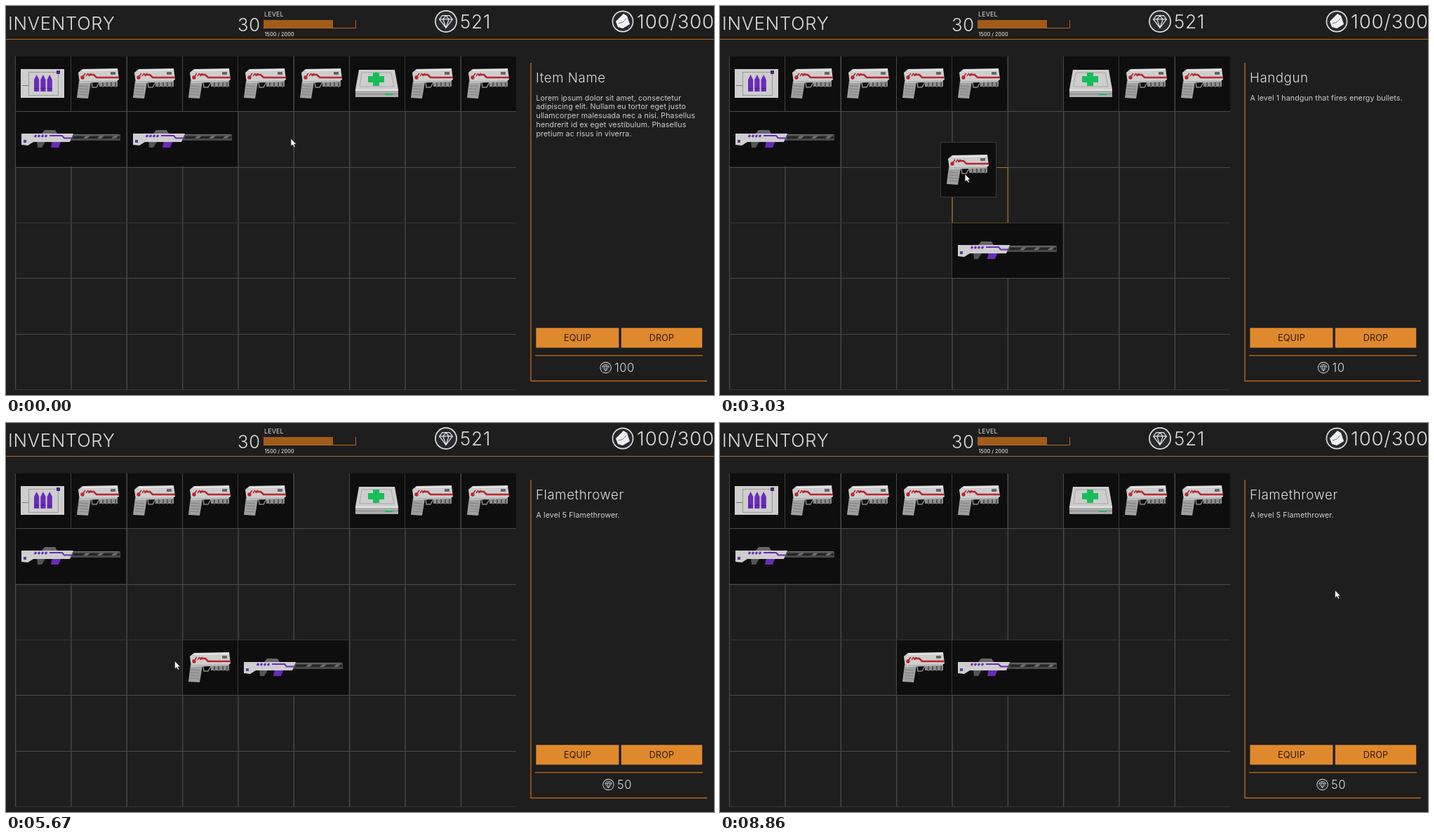
An HTML page with a canvas that plays this animation: 1009x555 px, repeating every 9.59 s.

```html
<!DOCTYPE html>
<html lang="en">
<head>
<meta charset="utf-8">
<title>Inventory</title>
<style>
  html, body { margin: 0; width: 100%; height: 100%; overflow: hidden; background: #1e1e1e; }
  canvas { display: block; }
</style>
</head>
<body>
<canvas id="stage" width="1009" height="555"></canvas>
<script>
const ctx = document.getElementById('stage').getContext('2d');
const LOOP = 9590;
const GRID = { x: 12.9, y: 71.4, pitch: 79.35, cols: 9, rows: 6 };
const ORANGE = '#b8661c', AMBER = '#e0892c', PALE = '#dcdcdc';
const PURPLE = '#6a2bb8', RED = '#b8262c', GREEN = '#18bd58', METAL = '#cecece';

const colX = c => GRID.x + c * GRID.pitch;
const rowY = r => Math.floor(GRID.y + r * GRID.pitch);

function rect(x, y, w, h, fill) {
  ctx.fillStyle = fill;
  ctx.fillRect(x, y, w, h);
}

function trace(points) {
  ctx.beginPath();
  for (let i = 0; i < points.length; i += 2) ctx.lineTo(points[i], points[i + 1]);
}

function poly(points, fill) {
  trace(points);
  ctx.fillStyle = fill;
  ctx.fill();
}

function line(points, color, width = 1) {
  trace(points);
  ctx.strokeStyle = color;
  ctx.lineWidth = width;
  ctx.stroke();
}

function disc(x, y, r, fill) {
  ctx.beginPath();
  ctx.arc(x, y, r, 0, 7);
  ctx.fillStyle = fill;
  ctx.fill();
}

function repeat(count, x, step, draw) {
  for (let i = 0; i < count; i++) draw(x + i * step);
}

function at(x, y, draw, scale = 1) {
  ctx.save();
  ctx.translate(x, y);
  ctx.scale(scale, scale);
  draw();
  ctx.restore();
}

// Large sizes get extra tracking to undo the tighter display cut.
function setFont(size, weight) {
  ctx.font = `${weight} ${size}px Inter, "Open Sans", sans-serif`;
  ctx.letterSpacing = `${size * (size > 14 ? 0.03 : 0.01)}px`;
}

function text(str, x, y, size, { color = PALE, weight = 300, align = 'left' } = {}) {
  setFont(size, weight);
  ctx.textAlign = align;
  ctx.fillStyle = color;
  ctx.fillText(str, x, y);
}

// Item art, relative to the corner of its cell.
const art = {
  ammo() {
    rect(8, 19, 62, 41, METAL);
    ctx.strokeStyle = '#999';
    ctx.lineWidth = 1;
    ctx.strokeRect(19.5, 23.5, 42, 33);
    rect(10, 42, 9, 1, '#777');
    rect(59, 21, 5, 5, '#46247c');
    repeat(3, 27, 9.3, x => {
      poly([x, 51, x, 34, x + 3.6, 27, x + 7.2, 34, x + 7.2, 51], PURPLE);
      rect(x, 46, 7.2, 1, '#43207a');
    });
  },
  handgun() {
    poly([12, 36, 29, 37, 25, 61, 9, 60], '#a0a0a0');
    repeat(4, 43, 4, y => line([12, y, 25, y + 1], '#808080'));
    line([30, 38, 31, 45, 37, 45, 41, 38], '#888', 1.5);
    rect(41, 35, 26, 9, '#8d8d8d');
    repeat(4, 45, 6, x => rect(x, 38, 2, 7, '#555'));
    poly([11, 24, 17, 19, 67, 18, 69, 34, 64, 37, 13, 39], METAL);
    line([17, 21, 67, 20], '#e8e8e8', 2);
    line([13, 37, 64, 36], '#a2a2a2');
    line([25, 27, 33, 27, 37, 31, 69, 31], RED, 2.6);
    repeat(3, 18, 4, x => line([x, 29, x + 3, 25], RED, 1.6));
    disc(17, 31, 2.7, RED);
    rect(57, 23, 7, 4, '#666');
  },
  medkit() {
    poly([14, 20, 65, 20, 70, 48, 9, 48], METAL);
    rect(9, 48, 61, 11, '#acacac');
    rect(9, 48, 61, 2, '#e4e4e4');
    line([18, 24, 60, 24, 64, 44, 15, 44, 18, 24], '#a6a6a6');
    rect(9, 54, 61, 1, '#858585');
    rect(27, 29, 23, 9, GREEN);
    rect(34, 24, 9, 19, GREEN);
    rect(51, 54, 11, 2, GREEN);
  },
  rifle() {
    poly([31, 42, 44, 42, 38, 52, 32, 52], '#555');
    poly([53, 42, 66, 42, 62, 52, 51, 52], PURPLE);
    poly([38, 32, 42, 27, 57, 27, 60, 32], '#666');
    rect(78, 33, 72, 9, '#484848');
    rect(78, 33, 70, 1, '#777');
    rect(83, 36, 66, 3, '#242424');
    repeat(3, 97, 20, x => poly([x, 39, x + 4, 35, x + 10, 35, x + 6, 39], '#6c6c6c'));
    poly([9, 32, 83, 32, 78, 44, 26, 44, 18, 49, 9, 48], METAL);
    repeat(4, 28, 5, x => line([x, 37, x + 2, 34], PURPLE, 3));
    line([49, 35, 67, 35, 70, 38.5, 81, 38.5], PURPLE, 2);
    rect(12, 41, 4, 4, '#56409a');
  }
};

const spanOf = item => item.art === 'rifle' ? 2 : 1;

function drawItem(item, x, y) {
  rect(x + 1, y + 1, Math.floor(spanOf(item) * GRID.pitch) - 1, 78, '#0e0e0e');
  at(x, y, art[item.art]);
}

function badge() {
  disc(0, 0, 15.4, '#e2e2e2');
  disc(0, 0, 13.8, '#292a30');
}

function drawGem(x, y, r) {
  at(x, y, () => {
    badge();
    line([0, 9, -9, -3, -5, -8, 5, -8, 9, -3, 0, 9, -4, -3, 0, -8, 4, -3, 0, 9], '#e8e8e8', 1.2);
    line([-9, -3, 9, -3], '#e8e8e8', 1.2);
  }, r / 15);
}

function drawHeader() {
  text('INVENTORY', 3, 33.5, 25.6);
  text('30', 330, 36, 25.6);
  text('LEVEL', 368, 14.5, 9, { weight: 400 });
  rect(367, 20, 99, 11, '#a05c1a');
  line([367, 31.5, 498.5, 31.5, 498.5, 20], ORANGE);
  text('1500 / 2000', 368.5, 43, 7.2, { weight: 500 });
  drawGem(627, 22, 15.5);
  text('521', 647, 32, 26.3);
  at(879, 22, () => {
    badge();
    poly([-10, 0, 1, -11, 6, -8, 10, 4, 0, 10, -7, 8], '#f0f0f0');
    line([-6, 3, 0, 1, 5, -4], '#777');
  });
  text('100/300', 899, 32, 27.5);
  rect(0, 47, 1009, 1, ORANGE);
}

const lineV = (c, y0, y1, color) => rect(colX(c), y0, 1.4, y1 - y0, color);
const lineH = (r, x0, x1, color) => rect(x0, rowY(r), x1 - x0, 1, color);

function drawGrid() {
  for (let c = 0; c < GRID.cols; c++) lineV(c, 72, 547, '#484848');
  for (let r = 1; r <= GRID.rows; r++) lineH(r, 13, 727, r % 3 ? '#4a4a4a' : '#363636');
}

const flame = { name: 'Flamethrower', info: ['A level 5 Flamethrower.'], price: '50' };
const panels = [
  { from: 0, name: 'Item Name', price: '100', info: [
    'Lorem ipsum dolor sit amet, consectetur',
    'adipiscing elit. Nullam eu tortor eget justo',
    'ullamcorper malesuada nec a nisi. Phasellus',
    'hendrerit id ex eget vestibulum. Phasellus',
    'pretium ac risus in viverra.'] },
  { from: 900, ...flame },
  { from: 2590, name: 'Handgun', info: ['A level 1 handgun that fires energy bullets.'], price: '10' },
  { from: 4320, ...flame }
];

function drawButton(label, x, w) {
  rect(x, 459.3, w, 28.2, AMBER);
  text(label, x + w / 2, 477.5, 12.7, { color: '#2a1d10', weight: 400, align: 'center' });
}

function drawPanel(t) {
  const panel = panels.findLast(p => t >= p.from);
  line([748, 81, 748, 535, 999, 535], ORANGE, 1.4);
  text(panel.name, 755, 108.5, 18.7);
  panel.info.forEach((row, i) =>
    text(row, 755.5, 134.5 + i * 12.75, 10.65, { color: '#cfcfcf', weight: 400 }));
  drawButton('EQUIP', 755.4, 118);
  drawButton('DROP', 876.8, 115.4);
  rect(754, 498, 239, 1.3, ORANGE);
  setFont(16.7, 300);
  const left = 871.5 - (21 + ctx.measureText(panel.price).width) / 2;
  drawGem(left + 8, 516, 8);
  text(panel.price, left + 20.5, 522, 16.7);
}

// Pointer stops: arrival, departure, x, y. Equal times mean passing through.
const stops = [
  [0, 20, 406, 189],
  [240, 1080, 267, 191],
  [1190, 1190, 301, 239],
  [1650, 2210, 408, 349],
  [2380, 2380, 417, 157],
  [2500, 2720, 440, 118],
  [3180, 3180, 296, 313],
  [3300, 3680, 290, 333],
  [3790, 3790, 266, 290],
  [4150, 4440, 129, 197],
  [4750, 4750, 211, 323],
  [5240, 5650, 243, 343],
  [5880, 6090, 138, 201],
  [6380, 6380, 467, 276],
  [6500, 6500, 620, 299],
  [6890, LOOP, 876.5, 238.5]
];
const path = stops.flatMap(([arrive, leave, x, y]) =>
  arrive === leave ? [[arrive, x, y]] : [[arrive, x, y], [leave, x, y]]);

// Zero at holds and turning points, so the path never overshoots a stop.
function slope(i, axis) {
  const a = path[i - 1], b = path[i], c = path[i + 1];
  if (!a || !c || (b[axis] - a[axis]) * (c[axis] - b[axis]) <= 0) return 0;
  return (c[axis] - a[axis]) / (c[0] - a[0]);
}

function pointer(t) {
  const i = Math.max(0, path.findLastIndex(p => t >= p[0]));
  const a = path[i], b = path[i + 1] || a;
  const span = b[0] - a[0] || 1, u = (t - a[0]) / span;
  return [1, 2].map(k => a[k] + (b[k] - a[k]) * u * u * (3 - 2 * u)
    + slope(i, k) * span * u * (1 - u) ** 2
    + slope(i + 1, k) * span * u * u * (u - 1));
}

// Each drag: start, end, then the cell where the item lands.
const items = [
  { art: 'ammo', cell: [0, 0] },
  ...[1, 2, 3, 4, 7, 8].map(c => ({ art: 'handgun', cell: [c, 0] })),
  { art: 'handgun', cell: [5, 0], drags: [[2720, 3530, 3, 3]] },
  { art: 'medkit', cell: [6, 0] },
  { art: 'rifle', cell: [0, 1], drags: [[4450, 5440, 0, 1], [6110, 7120, 0, 1]] },
  { art: 'rifle', cell: [2, 1], drags: [[1100, 2000, 4, 3]] }
];

function drawHighlight(x, y, span) {
  const c = Math.round((x - GRID.x) / GRID.pitch - 0.01);
  const r = Math.round((y - GRID.y) / GRID.pitch);
  if (c < 0 || r < 0 || c + span > GRID.cols || r >= GRID.rows) return;
  for (const edge of [0, 1]) {
    lineV(c + edge * span, rowY(r), rowY(r + 1), '#8a7020');
    lineH(r + edge, colX(c), colX(c + span), (r + edge) % 3 ? '#94791a' : '#5c4d1c');
  }
}

function drawDragged(item, t) {
  const span = spanOf(item);
  const w = Math.floor(span * GRID.pitch);
  const [cx, cy] = pointer(t - 10);
  const x = Math.round(cx - w / 2 + 0.5), y = Math.round(cy - 39.5);
  drawHighlight(x, y, span);
  drawItem(item, x, y);
  ctx.strokeStyle = '#3a3a3a';
  ctx.lineWidth = 1;
  ctx.strokeRect(x + 0.5, y + 0.5, w, 78);
}

function drawItems(t) {
  let held = null;
  for (const item of items) {
    let cell = item.cell;
    for (const [start, end, c, r] of item.drags || []) {
      if (t >= start && t < end) held = item;
      if (t >= end) cell = [c, r];
    }
    if (held !== item) drawItem(item, Math.round(colX(cell[0])), rowY(cell[1]));
  }
  if (held) drawDragged(held, t);
}

function drawPointer(t) {
  const [x, y] = pointer(t);
  at(x, y, () => {
    const arrow = [0, 0, 0, 11, 2.6, 8.8, 4.4, 12.6, 6.2, 11.9, 4.6, 8.2, 7.8, 8.2, 0, 0];
    poly(arrow, '#fff');
    line(arrow, '#111', 0.6);
  });
}

function frame(now) {
  const t = now % LOOP;
  rect(0, 0, 1009, 555, '#1e1e1e');
  drawHeader();
  drawGrid();
  drawPanel(t);
  drawItems(t);
  drawPointer(t);
  requestAnimationFrame(frame);
}
requestAnimationFrame(frame);
</script>
</body>
</html>
```
